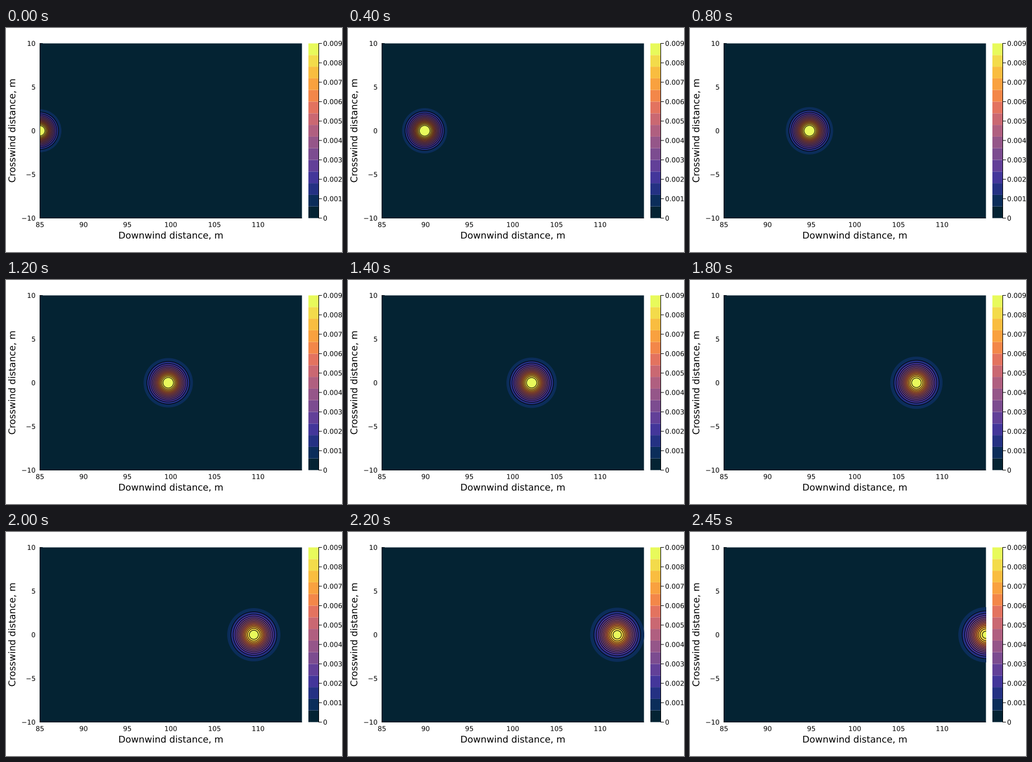
Recreate the animation shown at these times as a matplotlib script. Size 600 px wide and 400 px high, loop 2.5 s.

```python
import math

import numpy as np
import matplotlib.pyplot as plt
from matplotlib.animation import FuncAnimation
from matplotlib.patches import Circle, PathPatch, Rectangle
from matplotlib.path import Path
from matplotlib.textpath import TextPath
from matplotlib.transforms import Affine2D

WIDTH, HEIGHT, DPI = 600, 400, 100
PX = 72 / DPI                      # one pixel in points
FRAMES = 50
LEFT, RIGHT, TOP, BOTTOM = 60.5, 528.5, 27.5, 339.5
SCALE = (RIGHT - LEFT) / 30        # pixels per metre
MID_X, MID_Y = (LEFT + RIGHT) / 2, (TOP + BOTTOM) / 2
BANDS, C_MAX = 15, 0.009
STEP = C_MAX / BANDS
TICK_SIZE, LABEL_SIZE = 12, 16.5   # font sizes in pixels

# Thermal colour map, evenly spaced stops
STOPS = np.array([
    (4, 35, 51), (13, 48, 100), (53, 50, 155), (93, 62, 153),
    (126, 77, 143), (158, 89, 135), (193, 100, 121), (225, 113, 97),
    (246, 139, 69), (251, 173, 60), (246, 211, 70), (232, 250, 91),
]) / 255


def thermal(t):
    grid = np.linspace(0, 1, len(STOPS))
    return tuple(np.interp(t, grid, STOPS[:, i]) for i in range(3))


COLORS = [thermal(k / (BANDS - 1)) for k in range(BANDS)]

fig = plt.figure(figsize=(WIDTH / DPI, HEIGHT / DPI), dpi=DPI, facecolor="white")
ax = fig.add_axes([0, 0, 1, 1])
ax.set_xlim(0, WIDTH)
ax.set_ylim(HEIGHT, 0)
ax.axis("off")


def box(x0, y0, x1, y1, color):
    ax.add_patch(Rectangle((x0, y0), x1 - x0, y1 - y0, fc=color, ec="none",
                           lw=0, snap=False, zorder=2))


def line(x0, y0, x1, y1, z=1):
    ax.plot([x0, x1], [y0, y1], color="black", lw=PX, zorder=z, snap=False,
            solid_capstyle="butt")


def label(x, y, s, size, align, angle=0):
    """Text as outlines, aligned by its ink: 0 left, 0.5 centre, 1 right."""
    path = TextPath((0, 0), s, size=size, prop={"family": "DejaVu Sans"})
    ink = path.get_extents()
    move = Affine2D().translate(-ink.x0 - align * ink.width, 0)
    move.scale(1, -1).rotate_deg(-angle).translate(x, y)
    ax.add_patch(PathPatch(move.transform_path(path), fc="black", ec="none",
                           lw=0, snap=False, zorder=5))


# Axes lie under the filled plot area
line(LEFT, TOP - 0.5, LEFT, BOTTOM + 0.5)
line(LEFT, BOTTOM, RIGHT, BOTTOM)
line(LEFT, TOP, LEFT + 5, TOP)
box(LEFT, TOP, RIGHT, BOTTOM, COLORS[0])

for v in range(85, 115, 5):
    label(LEFT + (v - 85) * SCALE, 355.4, str(v), TICK_SIZE, 0.5)
for v in range(-10, 11, 5):
    text = str(v).replace("-", "\u2212")
    label(52, MID_Y + 4.4 - v * SCALE, text, TICK_SIZE, 1)
label(MID_X, 376, "Downwind distance, m", LABEL_SIZE, 0.5)
label(16.5, MID_Y, "Crosswind distance, m", LABEL_SIZE, 0.5, angle=90)

# Colour bar
BAR_H = (BOTTOM - TOP) / BANDS
for k, color in enumerate(COLORS):
    box(540, BOTTOM - (k + 1) * BAR_H, 558.5, BOTTOM - k * BAR_H, color)
line(558.5, TOP - 0.5, 558.5, BOTTOM + 0.5, z=3)
for i in range(10):
    y = BOTTOM - i * (BOTTOM - TOP) / 9
    line(558.5, y, 564, y, z=3)
    label(567, y + 4.4, f"{i / 1000:.3f}" if i else "0", TICK_SIZE, 0)

# Contour bands of the puff, outermost first; the outer one has no outline
window = Path([(LEFT + 0.5, TOP), (RIGHT, TOP), (RIGHT, BOTTOM),
               (LEFT + 0.5, BOTTOM), (LEFT + 0.5, TOP)])
rings = []
for k in range(1, BANDS):
    ring = Circle((LEFT, MID_Y), 1, fc=COLORS[k], zorder=4,
                  ec="black" if k > 1 else "none", lw=PX)
    ax.add_patch(ring)
    ring.set_clip_path(window, ax.transData)
    rings.append(ring)


def puff(x):
    """Crosswind spread and ground-level peak of a Gaussian puff at x metres."""
    sy = 0.02 * x ** 0.89
    sz = 0.05 * x ** 0.61
    peak = 0.0587 / (sy * sy * sz) * math.exp(-1.5 ** 2 / (2 * sz * sz))
    return sy, peak


def draw(n):
    x = 85 + 30 * n / (FRAMES - 1)
    sigma, peak = puff(x)
    for k, ring in enumerate(rings, 1):
        ratio = max(peak / (k * STEP), 1)
        ring.center = (LEFT + (x - 85) * SCALE, MID_Y)
        ring.radius = SCALE * sigma * math.sqrt(2 * math.log(ratio))
    return rings


anim = FuncAnimation(fig, draw, frames=FRAMES, interval=50, repeat=True,
                     repeat_delay=0, blit=False)
plt.show()
```
